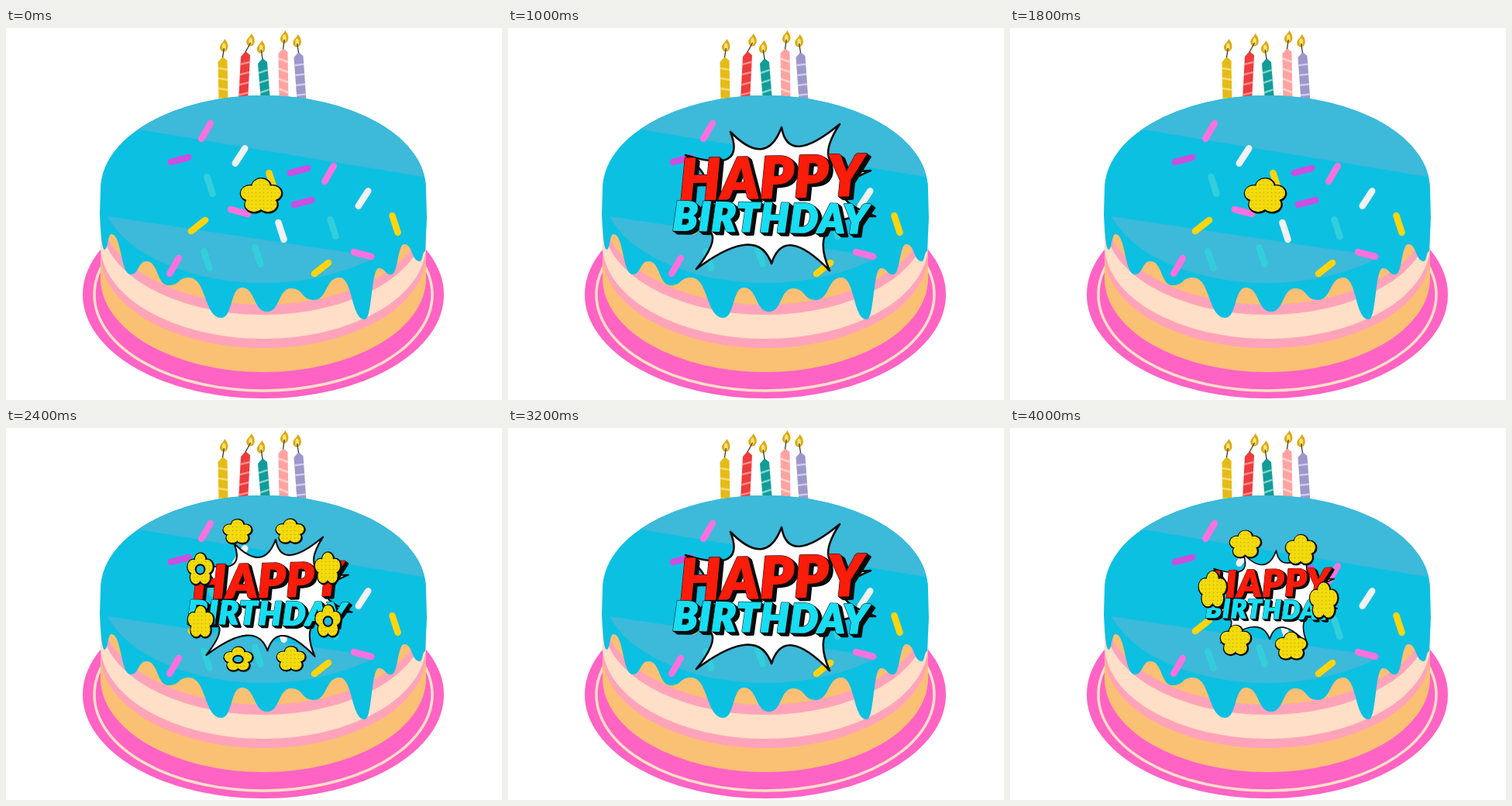
Write an HTML page that moves like this. It is 640 px wide and 480 px high and loops after 4.05 s.

```html
<!DOCTYPE html>
<html lang="en">
<head>
<meta charset="utf-8">
<title>Birthday cake</title>
<style>
html, body { margin: 0; width: 100%; height: 100%; overflow: hidden; background: #fff; }
svg { display: block; width: 640px; height: 480px; }
text { font-family: Lato, "Open Sans", sans-serif; font-weight: 900; font-style: italic; text-anchor: middle; }
</style>
</head>
<body>
<svg viewBox="0 0 640 480">
  <defs>
    <clipPath id="face"><ellipse cx="332" cy="208" rx="210" ry="121"/></clipPath>
    <pattern id="dots" width="5" height="5" patternUnits="userSpaceOnUse">
      <rect width="5" height="5" fill="#f3db0c"/><circle cx="2.5" cy="2.5" r=".8" fill="#c9ad08"/>
    </pattern>
  </defs>
  <g id="candles"></g>
  <ellipse cx="332" cy="344" rx="233" ry="134" fill="#ff63c4"/>
  <ellipse cx="332" cy="344" rx="218" ry="124" fill="none" stroke="#ffdfc7" stroke-width="3.5"/>
  <g id="layers"></g>
  <path id="icing" fill="#0cc0e2"/>
  <g clip-path="url(#face)" fill="#3db9d9">
    <path d="M172 131L538 192V80H122Z"/><path d="M131 243L478 295V340H122Z"/>
  </g>
  <g id="sprinkles" stroke-width="8.5" stroke-linecap="round"></g>
  <g id="show"></g>
</svg>
<script>
const $ = id => document.getElementById(id);
const times = (n, make) => Array.from({ length: n }, (_, i) => make(i)).join('');
const INK = '#0b0b0b', CX = 332, RX = 210, RY = 121;

// Every layer is the same curve, lifted to its lowest point
$('layers').innerHTML = [
  ['#fac074', 444], ['#ffa3ba', 413], ['#ffdfc7', 401], ['#ffa3ba', 370], ['#fac074', 357]
].map(([c, low]) =>
  `<path fill="${c}" d="M${CX - RX} 200V${low - RY}a${RX} ${RY} 0 0 0 ${2 * RX} 0V200Z"/>`).join('');

// Icing hem: low and high turning points from right to left
const hem = [[534, 301], [514, 279], [497, 318], [481, 310], [463, 376], [430, 322], [397, 351], [368, 336],
  [337, 366], [304, 335], [278, 374], [236, 322], [210, 332], [181, 301], [161, 318], [136, 266], [127, 286]];
let edge = 'M122 208A210 121 0 0 1 542 208L543 245L541 288', px = 541, py = 288;
for (const [x, y] of hem) {
  const k = (x - px) * .55;
  edge += `C${px + k} ${py} ${x - k} ${y} ${x} ${y}`;
  [px, py] = [x, y];
}
$('icing').setAttribute('d', edge + 'Q123 286 121 240Z');

// Sprinkles: colour, angle, place, copies along the repeat of the pattern
const pink = '#f972e0', violet = '#cb4fe2', white = '#f1f1f1', gold = '#fdd50f', teal = '#33cedb';
$('sprinkles').innerHTML = [
  [pink, -60, 258, 133, 2], [pink, -60, 217, 307, 1], [pink, 15, 301, 237, 2],
  [violet, -15, 224, 170, 2], [violet, -15, 378, 184, 1],
  [white, -57, 302, 165, 2], [white, 72, 355, 262, 1],
  [gold, 72, 343, 198, 2], [gold, -38, 248, 255, 2],
  [teal, 72, 263, 203, 2], [teal, 72, 259, 299, 1], [teal, 72, 325, 294, 1]
].map(([c, turn, x, y, n]) => times(n, i =>
  `<path stroke="${c}" d="M-11.5 0H11.5" transform="translate(${x + i * 159} ${y + i * 55}) rotate(${turn})"/>`)).join('');

// Candles: colour, stripe, base x, lean, top, stripe rise
$('candles').innerHTML = [
  ['#e5bb18', '#f5dc75', 280.5, -1, 37, 4], ['#ee3b3e', '#fa8f8c', 306, 3, 30, -6],
  ['#109c97', '#7fd3cf', 335, -4, 39, -8], ['#ffa3a0', '#ffd2cf', 358.5, -1, 26, 9],
  ['#9d97cb', '#cfcbea', 381.5, -4, 31, -3]
].map(([c, stripe, x, lean, top, rise], i) => {
  const tip = x + lean, fx = tip + lean * 1.2 + 3, fy = top - 14;
  const wax = `M${x - 6} 94L${tip - 6} ${top + 7}L${tip} ${top}L${tip + 6} ${top + 5}L${x + 6} 94Z`;
  return `<clipPath id="c${i}"><path d="${wax}"/></clipPath><path d="${wax}" fill="${c}"/>
    <g clip-path="url(#c${i})" stroke="${stripe}" stroke-width="2.5">
      ${times(4, k => `<path d="M${x - 12} ${top + 16 + k * 13 - rise / 2}l24 ${rise}"/>`)}</g>
    <path transform="translate(${fx} ${fy}) rotate(6)" fill="#dcab10" d="M0 -9C4 -5 6 -1 5 3C4 9 -4 9 -5 3C-6 -1 -2 -3 0 -9Z"/>
    <ellipse cx="${fx}" cy="${fy + 1}" rx="2.3" ry="4.5" fill="#f8e27b"/>
    <path d="M${tip} ${top + 1}L${fx} ${fy + 3}" stroke="#443" stroke-width="1.4"/>`;
}).join('');

// Cloud of five lobes around a middle, filling a box of w by h
function cloud(x, y, w, h, hole) {
  const lobes = grow => times(6, i => {
    const a = (i * 72 - 90) * Math.PI / 180, out = i < 5 ? .27 : 0;
    return `<ellipse cx="${x + Math.cos(a) * w * out}" cy="${y + Math.sin(a) * h * out}"
      rx="${w * .24 + grow}" ry="${h * .24 + grow}"/>`;
  });
  return `<g fill="${INK}" transform="translate(.6 .6)">${lobes(0)}</g><g fill="url(#dots)">${lobes(-1.8)}</g>` +
    (hole ? `<ellipse cx="${x}" cy="${y}" rx="${w * .16}" ry="${h * .14}" fill="#22bbdd" stroke="${INK}" stroke-width="2"/>` : '');
}

// Ring of n clouds, taller at the sides; holed rings have every other cloud pierced
function ring(n, start, r, size, holed) {
  return times(n, i => {
    const a = start + i * 2 * Math.PI / n, side = Math.abs(Math.cos(a));
    return cloud(333 + Math.cos(a) * r, 216 + Math.sin(a) * r,
      size * (1 - .15 * side), size * (.65 + .45 * side), holed && i % 2 && i > 1);
  });
}

function word(str, x, y, size, fill, space, turn) {
  const put = (d, color, line) => `<text x="${x + d}" y="${y + d * .8}" font-size="${size}"
    letter-spacing="${space}" fill="${color}" stroke="${color}" stroke-width="${line}">${str}</text>`;
  return `<g transform="rotate(${turn} ${x} ${y})" stroke-linejoin="round">` +
    times(6, d => put(d, INK, 3)) + put(0, fill, 2) + '</g>';
}

// Star: tips joined by arcs that sag towards the middle
const tips = [[229, 164], [287, 134], [353, 128], [428, 124], [468, 184], [474, 243],
  [415, 313], [340, 304], [243, 311], [214, 262]];
const sag = (a, b, mid) => mid + (1 - .6) * ((a + b) / 2 - mid);
const star = 'M' + tips[0] + tips.map(([x, y], i) => {
  const [nx, ny] = tips[(i + 1) % tips.length];
  return `Q${sag(x, nx, 342)} ${sag(y, ny, 215)} ${nx} ${ny}`;
}).join('') + 'Z';
const badge = `<path d="${star}" fill="#fff" stroke="${INK}" stroke-width="2.6" stroke-linejoin="round"/>` +
  word('HAPPY', 341, 219, 73, '#fb1c0a', 1, -1.5) + word('BIRTHDAY', 339, 263, 51, '#17def3', 1.6, 1);

// Badge scaled about the point it bursts from
const burst = s => `<g transform="translate(${326 * (1 - s)} ${214 * (1 - s)}) scale(${s})">${badge}</g>`;

const rest = burst(1), swell = burst(1.09);
const poses = [
  cloud(329, 217, 56, 48),
  burst(.33) + ring(6, .1, 26, 46) + cloud(329, 218, 50, 50),
  burst(.65) + ring(6, .1, 72, 46),
  burst(.815) + ring(8, -1.97, 89, 42, true),
  swell + ring(8, -1.97, 115, 15),
  rest, swell, rest, swell
];
$('show').innerHTML = poses.map(p => `<g visibility="hidden">${p}</g>`).join('');

const LOOP = 4050, STEP = 200;
const groups = [...$('show').children];
let shown = -1;
function tick() {
  const n = Math.floor(performance.now() % LOOP / STEP) % groups.length;
  if (n !== shown) {
    groups.forEach((g, i) => g.setAttribute('visibility', i === n ? 'visible' : 'hidden'));
    shown = n;
  }
  requestAnimationFrame(tick);
}
tick();
</script>
</body>
</html>
```
